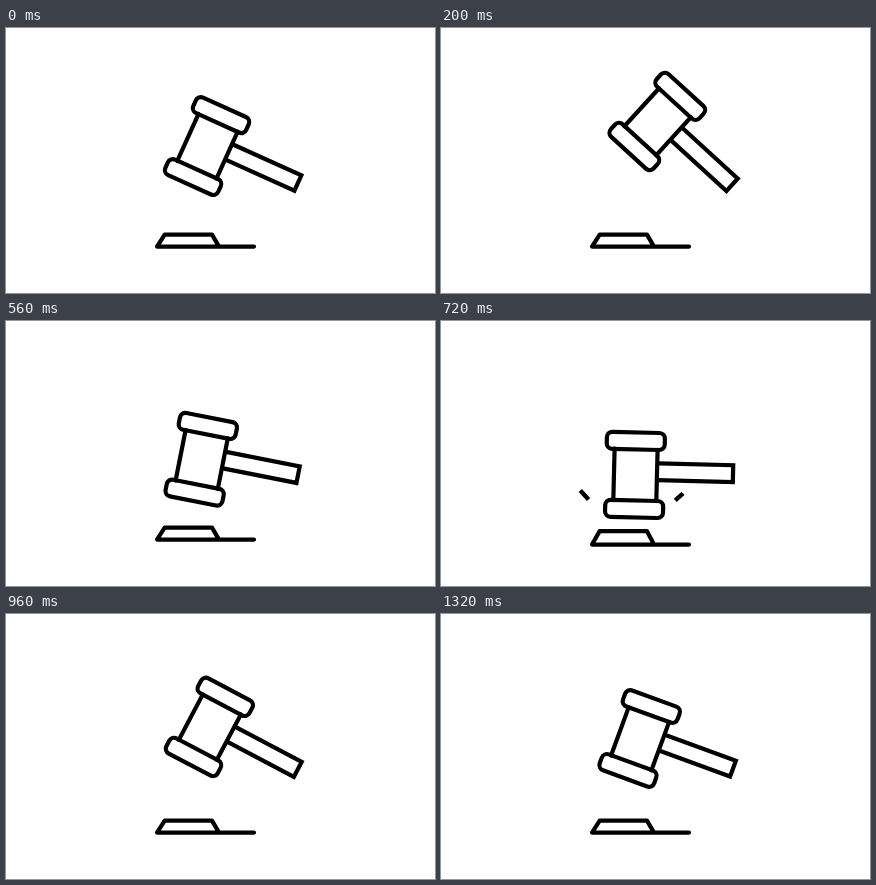
Animation of 429x265 px, one loop 1.52 s. Source, as an HTML page:

```html
<!DOCTYPE html>
<html lang="en">
<head>
<meta charset="utf-8">
<title>Gavel</title>
<style>
  html, body { margin: 0; width: 100%; height: 100%; overflow: hidden; background: #fff; }
  svg { display: block; width: 100vw; height: 100vh; }
</style>
</head>
<body>
<svg viewBox="0 0 429 265" fill="none" stroke="#000" stroke-width="4.2" stroke-linejoin="round" stroke-linecap="round">
  <path id="base"/>
  <!-- drawn level, with the pivot near the handle's end as origin -->
  <g id="gavel">
    <path d="M-113 -23V28.5M-70 -23V28.5"/>
    <rect x="-121" y="-39.8" width="58" height="17" rx="5.5"/>
    <rect x="-121" y="28.2" width="58" height="17" rx="5.5"/>
    <path d="M-69 -9.4H6V7.4H-69" stroke-linejoin="miter"/>
  </g>
  <g stroke-width="4.4" stroke-linecap="butt">
    <path id="sparkL"/>
    <path id="sparkR"/>
  </g>
</svg>
<script>
const LOOP = 1520, STEP = 40, REST = 1320;
const PIVOT = [286, 153.5];
const $ = id => document.getElementById(id);
const base = $('base'), gavel = $('gavel'), sparkL = $('sparkL'), sparkR = $('sparkR');

const clamp = p => Math.min(1, Math.max(0, p));
const span = (t, a, b) => clamp((t - a) / (b - a));
const easeOut = p => 1 - (1 - p) * (1 - p);
const easeInOut = p => (1 - Math.cos(Math.PI * p)) / 2;

// [start, end, from angle, to angle, easing]
const swings = [
  [0, 420, 24.3, 49.3, easeOut],
  [420, 635, 49.3, -3, easeInOut],
  [635, 980, -3, 28.1, easeInOut],
  [1000, 1340, 28.1, 20, easeInOut]
];

function angleAt(t) {
  const [a, b, from, to, ease] = swings.findLast(s => t >= s[0]);
  return from + (to - from) * ease(span(t, a, b));
}

function drawBase(t) {
  const push = Math.sin(Math.PI * span(t, 600, 820));
  const top = 206.6 + 3.6 * push, low = 218.6 + 5 * push;
  base.setAttribute('d', `M248 ${low}H151L158.7 ${top}H206L213 ${low}`);
}

// A dash whose head runs ahead of its tail along one ray
function drawSpark(el, t, x, y, dx, dy) {
  const head = span(t, 640, 745), tail = span(t, 690, 802);
  el.setAttribute('visibility', head > tail ? 'visible' : 'hidden');
  el.setAttribute('d', `M${x + dx * tail} ${y + dy * tail}L${x + dx * head} ${y + dy * head}`);
}

function render(now) {
  const t = Math.min(REST, Math.floor((now % LOOP) / STEP) * STEP);
  gavel.setAttribute('transform', `translate(${PIVOT}) rotate(${angleAt(t)})`);
  drawBase(t);
  drawSpark(sparkL, t, 152, 183.5, -16.7, -18.5);
  drawSpark(sparkR, t, 230, 183, 15.8, -13.9);
}

let start;
function tick(now) {
  start ??= now;
  render(now - start);
  requestAnimationFrame(tick);
}
render(0);
requestAnimationFrame(tick);
</script>
</body>
</html>
```
